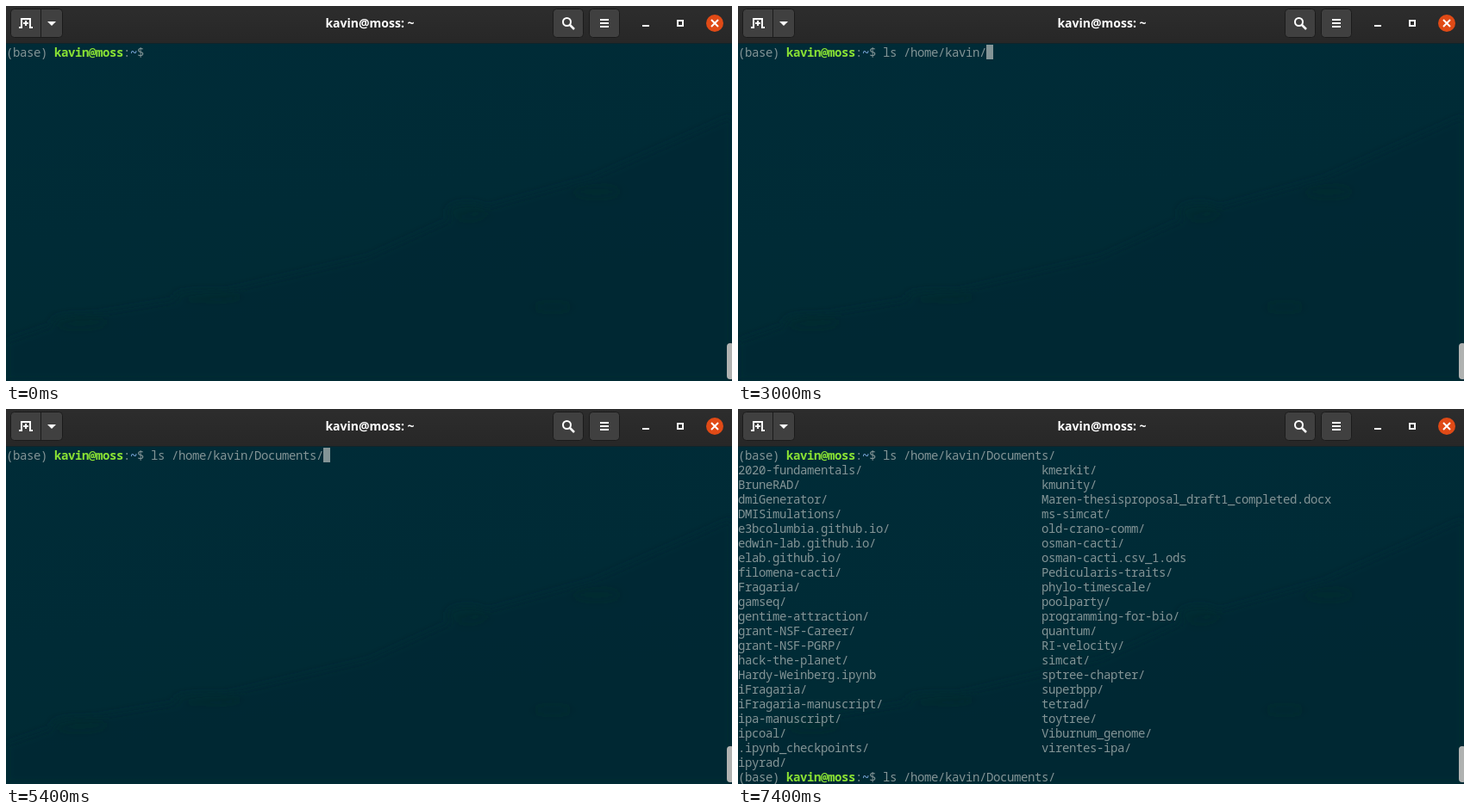
An HTML page that plays this animation: 842x436 px, repeating every 8 s.

```html
<!DOCTYPE html>
<html lang="en">
<head>
<meta charset="utf-8">
<title>Terminal</title>
<style>
html, body { margin: 0; width: 100%; height: 100%; overflow: hidden; background: #002b36; }
#stage { position: relative; width: 842px; height: 436px; overflow: hidden; }
svg { position: absolute; left: 0; top: 0; }
#title { font: bold 14px "Noto Sans", "Open Sans", sans-serif; fill: #fff; text-anchor: middle; }
#screen {
  position: absolute; left: 0; top: 45px; margin: 0; color: #839496;
  font: 14px/17px "Noto Sans Mono", "DejaVu Sans Mono", monospace;
  letter-spacing: -.4px; /* 8px cells */
}
#screen b { color: #8ae234; }
#screen i { color: #729fcf; font-style: normal; font-weight: bold; }
#cursor { position: absolute; width: 8px; height: 17px; background: #839496; }
#thumb { position: absolute; left: 836px; top: 392px; width: 8px; height: 42px; border-radius: 4px; background: #b0b2b1; }
</style>
</head>
<body>
<div id="stage">
  <svg width="842" height="436" viewBox="0 0 842 436">
    <defs>
      <linearGradient id="bar" x2="0" y2="1"><stop stop-color="#2d2d2d"/><stop offset="1" stop-color="#272727"/></linearGradient>
      <linearGradient id="sky" x2=".3" y2="1"><stop stop-color="#002c38"/><stop offset=".6" stop-color="#002b36"/><stop offset="1" stop-color="#002b33"/></linearGradient>
      <filter id="soft" x="-20%" y="-50%" width="140%" height="200%"><feGaussianBlur stdDeviation="5"/></filter>
    </defs>
    <rect width="842" height="436" fill="url(#sky)"/>
    <g filter="url(#soft)">
      <path d="M0 390L80 362L240 335L420 292L530 242L680 200L842 128V436H0Z" fill="#002a32" opacity=".6"/>
      <g fill="#002830" opacity=".65">
        <ellipse cx="85" cy="367" rx="32" ry="8"/>
        <ellipse cx="235" cy="337" rx="40" ry="6"/>
        <ellipse cx="535" cy="239" rx="24" ry="10"/>
        <ellipse cx="685" cy="216" rx="28" ry="7"/>
        <ellipse cx="634" cy="350" rx="24" ry="5"/>
      </g>
    </g>
    <rect width="842" height="43" fill="url(#bar)"/>
    <path d="M0 43.5H842" stroke="#10242a"/>
    <g fill="#404040" stroke="#1b1b1b">
      <rect x="5.5" y="3.5" width="60" height="33" rx="4"/>
      <path d="M40.5 4V36"/>
      <rect x="634.5" y="3.5" width="35" height="33" rx="4"/>
      <rect x="676.5" y="3.5" width="35" height="33" rx="4"/>
    </g>
    <circle cx="822" cy="20" r="10" fill="#e04a16"/>
    <g fill="none" stroke="#fff" stroke-width="2">
      <path d="M15 25H18V15H28V25H31M23 17V23M20 20H26"/>
      <circle cx="650.5" cy="18.5" r="4.5"/>
      <path d="M654 22L659 27" stroke-width="2.5"/>
      <path d="M689 16H699M689 20H699M689 24H699M738 23H746M779 17H785V23H779Z"/>
      <path d="M818 16L826 24M826 16L818 24"/>
    </g>
    <path d="M48 18H58L53 23Z" fill="#fff"/>
    <text id="title" x="422" y="25">kavin@moss: ~</text>
  </svg>
  <pre id="screen"></pre>
  <div id="cursor"></div>
  <div id="thumb"></div>
</div>
<script>
const LOOP = 8000, LISTED = 5700;
const prompt = "(base) <b>kavin@moss</b>:<i>~</i>$ ";
const command = "ls /home/kavin/Documents/";

// [time, characters on the line]; the larger jumps are tab completions
const keys = [[0, 0], [800, 1], [1000, 2], [1100, 3], [1500, 4], [1700, 5], [1800, 6], [1900, 9],
  [2400, 10], [2600, 11], [2900, 12], [3000, 15], [4000, 16], [4100, 17], [4200, 18], [4300, 25]];
const blinks = [300, 4900, 5400, 6200, 6800, 7400];

const left = `2020-fundamentals/ BruneRAD/ dmiGenerator/ DMISimulations/ e3bcolumbia.github.io/
  edwin-lab.github.io/ elab.github.io/ filomena-cacti/ Fragaria/ gamseq/ gentime-attraction/
  grant-NSF-Career/ grant-NSF-PGRP/ hack-the-planet/ Hardy-Weinberg.ipynb iFragaria/
  iFragaria-manuscript/ ipa-manuscript/ ipcoal/ .ipynb_checkpoints/ ipyrad/`.split(/\s+/);
const right = `kmerkit/ kmunity/ Maren-thesisproposal_draft1_completed.docx ms-simcat/ old-crano-comm/
  osman-cacti/ osman-cacti.csv_1.ods Pedicularis-traits/ phylo-timescale/ poolparty/
  programming-for-bio/ quantum/ RI-velocity/ simcat/ sptree-chapter/ superbpp/ tetrad/
  toytree/ Viburnum_genome/ virentes-ipa/`.split(/\s+/);
const listing = left.map((name, i) => name.padEnd(44) + (right[i] || "")).join("\n");

const screen = document.getElementById("screen");
const cursor = document.getElementById("cursor");
let shown;

function draw(now) {
  const t = now % LOOP;
  const count = keys.findLast(([time]) => time <= t)[1];
  const line = prompt + command.slice(0, count);
  const listed = t >= LISTED;
  const text = listed ? [line, listing, line].join("\n") : line;
  if (text !== shown) screen.innerHTML = shown = text;
  cursor.style.left = 168 + 8 * count + "px";
  cursor.style.top = (listed ? 419 : 45) + "px";
  cursor.hidden = blinks.filter(time => time <= t).length % 2 === 0;
}

const start = performance.now();
function tick() {
  draw(performance.now() - start);
  requestAnimationFrame(tick);
}
tick();
</script>
</body>
</html>
```
